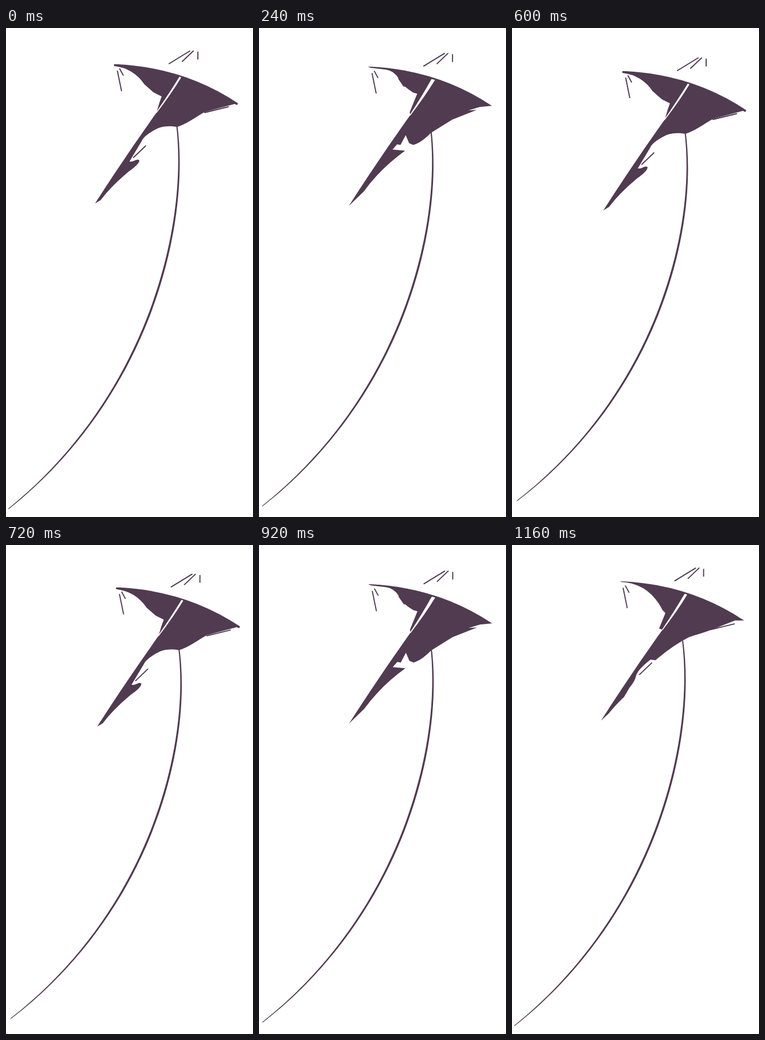
An HTML page for the animation above (1200 ms loop, 430 by 850 pixels).

```html
<!DOCTYPE html>
<html lang="en">
<head>
<meta charset="utf-8">
<title>Kite</title>
<style>
  html, body { margin: 0; width: 100%; height: 100%; overflow: hidden; background: #fff; }
  svg { display: block; width: 430px; height: 850px; fill: #503b50; }
  #slit { fill: #fff; }
  #dashes { fill: none; stroke: #503b50; stroke-width: 1.9; stroke-linecap: round; }
</style>
</head>
<body>
<svg viewBox="0 0 430 850">
  <path id="wire"/>
  <g id="kite"><path id="body"/><path id="slit"/><path id="dashes"/></g>
</svg>
<script>
const STEP = 40, LOOP = 1200, HOLD = 120;
const $ = id => document.getElementById(id);

// Strokes every brush drawing shares
const TOP = 'M188 63L194 63Q311 69 404 131';
const SPINE = 'L155 305Q207 224 262 147';
const RAYS = 'M284 62L320 40M307 58L326 40M334 42V54M194 75L201 109M198 71L204 82';
const SIDE_DASHES = 'M222 225L243 205M346 147L387 137';

// belly: right tip to tail; wing: hook to left tip; gap: slit width; nudge: shift of the rays
const drawings = [
  {
    belly: `L402 134 398 132 346 146C330 155 312 168 298 172C286 170 276 170 265 174
      Q240 186 236 197L215 232C222 234 228 226 232 230Q233 236 213 250Q182 276 165 299`,
    wing: 'L267 130 271 119 257 112 241 98Q222 70 188 66',
    gap: 3, nudge: 0, extra: SIDE_DASHES
  },
  {
    belly: `L383 133 363 139 378 138 335 155 298 178Q280 196 267 199L260 196 254 182 245 199
      239 198 231 207 253 209Q210 240 181 280`,
    wing: 'L261 142 274 110 267 108Q247 96 242 84Q234 70 219 68L193 65',
    gap: 6, nudge: 1.5, extra: 'M242 84L251 97'
  },
  {
    belly: `L389 132C381 135 371 144 357 148C339 151 324 154 309 162C295 170 285 181 271 192
      Q255 203 248 201L246 196 243 198 239 205 242 208Q228 230 203 244L179 280`,
    wing: 'L253 146 273 109 261 101Q249 94 245 84Q230 70 216 67L188 64',
    gap: 6, nudge: -3, extra: 'M202 250L190 266M255 145L272 112'
  },
  {
    belly: `L388 131 350 146C335 152 322 155 308 160Q280 174 250 200L241 199
      Q219 216 216 227Q214 237 205 247L195 264Q182 276 168 293`,
    wing: 'L256 145 267 118 262 113Q238 66 190 64',
    gap: 4.5, nudge: -.5, extra: SIDE_DASHES
  }
];
const order = [0, 0, 1, 2, 3];

// Tapered string: x, y, x shift, y shift, half width x, half width y
const nodes = [
  [297, 166, 4, 12, 1, 0],
  [320, 340, 4, 5.4, 2.1, 0],
  [250, 640, 4, -6.2, 1.8, 1.3],
  [4, 836, 4.5, -14, .3, .5]
];
function wirePath(sway) {
  const side = k => nodes.map(([x, y, dx, dy, wx, wy]) =>
    [x + dx * sway + k * wx, y + dy * sway + k * wy]);
  const [a, b, c, d] = side(1), [e, f, g, h] = side(-1);
  return `M${a}C${b} ${c} ${d}L${h}C${g} ${f} ${e}Z`;
}

function draw(now) {
  const t = Math.floor(now % LOOP / STEP) * STEP;
  const sway = (1 - Math.cos(2 * Math.PI * t / LOOP)) / 2;
  const { belly, wing, gap, nudge, extra } = drawings[order[Math.floor(t / HOLD) % order.length]];
  $('body').setAttribute('d', TOP + belly + SPINE + wing + 'Z');
  $('slit').setAttribute('d', `M${305 - gap} 84.5L305 86Q288 114 262 148L261 147Q${286 - gap / 2} 113 ${305 - gap} 84.5Z`);
  const rays = RAYS.replace(/([ML])(\d+)|V/g, (m, cmd, x) => cmd ? cmd + (+x + nudge) : m);
  $('dashes').setAttribute('d', rays + extra);
  $('kite').setAttribute('transform', `translate(${4 * sway},${12 * sway})`);
  $('wire').setAttribute('d', wirePath(sway));
}

let start;
function tick(now) {
  start ??= now;
  draw(now - start);
  requestAnimationFrame(tick);
}
draw(0);
requestAnimationFrame(tick);
</script>
</body>
</html>
```
